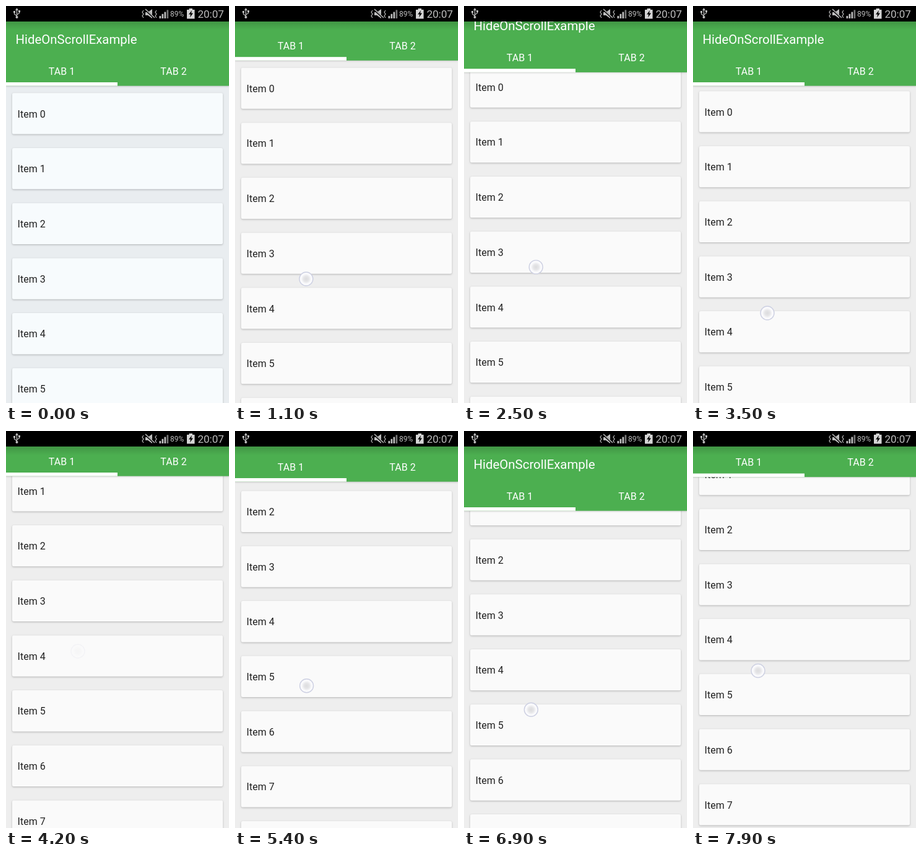
An HTML page with a canvas for the animation above (8000 ms loop, 360 px wide and 640 px high).

```html
<!DOCTYPE html>
<html lang="en">
<head>
<meta charset="utf-8">
<title>Hide on scroll</title>
<style>
  html, body { margin: 0; height: 100%; overflow: hidden; background: #eee; }
  canvas { display: block; width: 360px; height: 640px; }
</style>
</head>
<body>
<canvas id="stage" width="360" height="640"></canvas>
<script>
const ctx = document.getElementById('stage').getContext('2d');
const LOOP = 8000, TOOLBAR = 56, PITCH = 88.7;
const SNAP = 300;        // time the toolbar takes to settle
const SLOP = 8;          // finger travel before the list starts to move
const MAX_TRAVEL = 140;  // longer scrolls finish as a fling
const HOLD = 70, FADE = 60;

const drags = [
  { start: 560, end: 1600, by: 77, x: 117, y: 485 },
  { start: 2050, end: 3000, by: -74, x: 118, y: 383 },
  { start: 3500, end: 4150, by: 162.7, x: 120, y: 495 },
  { start: 4400, end: 4850, by: 64.3, x: 127, y: 475 },
  { start: 5180, end: 5570, by: -15, x: 118, y: 397 },
  { start: 6400, end: 7000, by: -77.5, x: 112, y: 370 },
  { start: 7350, end: 7900, by: 54.5, x: 109, y: 449 }
];

const clamp = (v, lo, hi) => Math.min(hi, Math.max(lo, v));
const mix = (a, b, p) => a + (b - a) * p;

function progress(t, from, to) {
  const p = clamp((t - from) / (to - from), 0, 1);
  return p * p * (3 - 2 * p);
}

// The toolbar follows each drag, then settles fully shown or fully hidden.
function listState(t) {
  let scroll = 0, hidden = 0;
  for (const { start, end, by } of drags) {
    const moved = by * progress(t, start, end);
    scroll += moved;
    hidden = clamp(hidden + moved, 0, TOOLBAR);
    const rest = hidden > TOOLBAR / 2 ? TOOLBAR : 0;
    hidden = mix(hidden, rest, progress(t, end, end + SNAP));
  }
  return { scroll, hidden };
}

function rect(x, y, w, h, color) {
  ctx.fillStyle = color;
  ctx.fillRect(x, y, w, h);
}

function text(str, x, y, size, color, align = 'left') {
  ctx.font = `${size}px Roboto, sans-serif`;
  ctx.textAlign = align;
  ctx.fillStyle = color;
  ctx.fillText(str, x, y);
}

function shape(d, color) {
  ctx.fillStyle = color;
  ctx.fill(new Path2D(d));
}

function line(d, color, width) {
  ctx.strokeStyle = color;
  ctx.lineWidth = width;
  ctx.stroke(new Path2D(d));
}

function withShadow(color, blur, dy, draw) {
  ctx.save();
  ctx.shadowColor = color;
  ctx.shadowBlur = blur;
  ctx.shadowOffsetY = dy;
  draw();
  ctx.restore();
}

function drawList(scroll, cardColor) {
  for (let i = 0; i < 10; i++) {
    const y = 140.3 + i * PITCH - scroll;
    withShadow('rgba(0,0,0,.25)', 3, 1, () => {
      ctx.fillStyle = cardColor;
      ctx.beginPath();
      ctx.roundRect(10, y, 340, 66.3, 2.5);
      ctx.fill();
    });
    text('Item ' + i, 18.6, y + 39.3, 16, '#212121');
  }
}

function drawHeader(hidden) {
  const bottom = 128.7 - hidden;
  withShadow('rgba(0,0,0,.15)', 2, 1, () => rect(0, 0, 360, bottom, '#4caf50'));
  const shade = ctx.createLinearGradient(0, 25, 0, 39);
  shade.addColorStop(0, 'rgba(0,0,0,.15)');
  shade.addColorStop(1, 'rgba(0,0,0,0)');
  rect(0, 25, 360, 14, shade);
  text('HideOnScrollExample', 15.5, 61 - hidden, 20.4, '#fff');
  text('TAB 1', 90, 111 - hidden, 16, '#fff', 'center');
  text('TAB 2', 270.5, 111 - hidden, 16, '#fff', 'center');
  rect(0, bottom - 5.7, 180, 5.7, '#fff');
}

function drawStatusBar() {
  const grey = '#bdbdbd';
  rect(0, 0, 360, 25, '#000');
  // USB
  line('M17.5 6V18M17.5 16L13.5 13V9.5M17.5 14L21.5 11.5V8.5', grey, 1.3);
  shape('M17.5 3L20 7H15ZM15.5 18A2 2 0 1 0 19.5 18A2 2 0 1 0 15.5 18M12 8H15V11H12ZM20 7H23V10H20Z', grey);
  // Muted speaker between vibration marks
  shape('M225 10H229L236 5V20L229 15H225Z', grey);
  for (const x of [220, 241])
    line(`M${x + 2} 7l-2 3l2 3l-2 3l2 3`, grey, 1.2);
  line('M224 5L239 19', '#000', 3);
  line('M225 5L240 19', grey, 1.5);
  // Signal bars
  for (let i = 0; i < 4; i++)
    rect(247.5 + i * 4, 16 - i * 3.2, 2.7, 4 + i * 3.2, i < 3 ? grey : '#777');
  text('89%', 265, 17, 12, grey);
  // Charging battery
  shape('M295.5 4H301V6H304.5V20.5H292V6H295.5Z', '#d5d5d5');
  shape('M300 7L295 13.5H298L297 18.5L302 11.5H299Z', '#000');
  text('20:07', 309.5, 19, 17, grey);
}

function drawTouch(t, { start, end, by, x, y, }) {
  const fadeIn = clamp((t - start + HOLD) / FADE, 0, 1);
  const alpha = Math.min(fadeIn, clamp(1 - (t - end) / FADE, 0, 1));
  if (!alpha) return;
  const p = progress(t, start, end);
  const travel = Math.min(Math.abs(by) + SLOP, MAX_TRAVEL) * Math.sign(by);
  ctx.save();
  ctx.globalAlpha = alpha;
  ctx.translate(x - 4 * p, y - travel * p);
  const glow = ctx.createRadialGradient(0, 0, 1, 0, 0, 8);
  glow.addColorStop(0, '#dedee0');
  glow.addColorStop(.5, '#e6e6e8');
  glow.addColorStop(1, '#fafafc');
  ctx.beginPath();
  ctx.arc(0, 0, 11, 0, Math.PI * 2);
  ctx.fillStyle = glow;
  ctx.fill();
  ctx.lineWidth = 1.4;
  ctx.strokeStyle = '#cdd0e2';
  ctx.stroke();
  ctx.restore();
}

function draw(t) {
  const { scroll, hidden } = listState(t);
  const cool = t < 500;
  rect(0, 0, 360, 640, cool ? '#e9edf0' : '#eee');
  drawList(scroll, cool ? '#f7fbfd' : '#fafafa');
  drawHeader(hidden);
  drawStatusBar();
  drags.forEach(drag => drawTouch(t, drag));
}

const begin = performance.now();
function frame() {
  draw((performance.now() - begin) % LOOP);
  requestAnimationFrame(frame);
}
frame();
</script>
</body>
</html>
```
